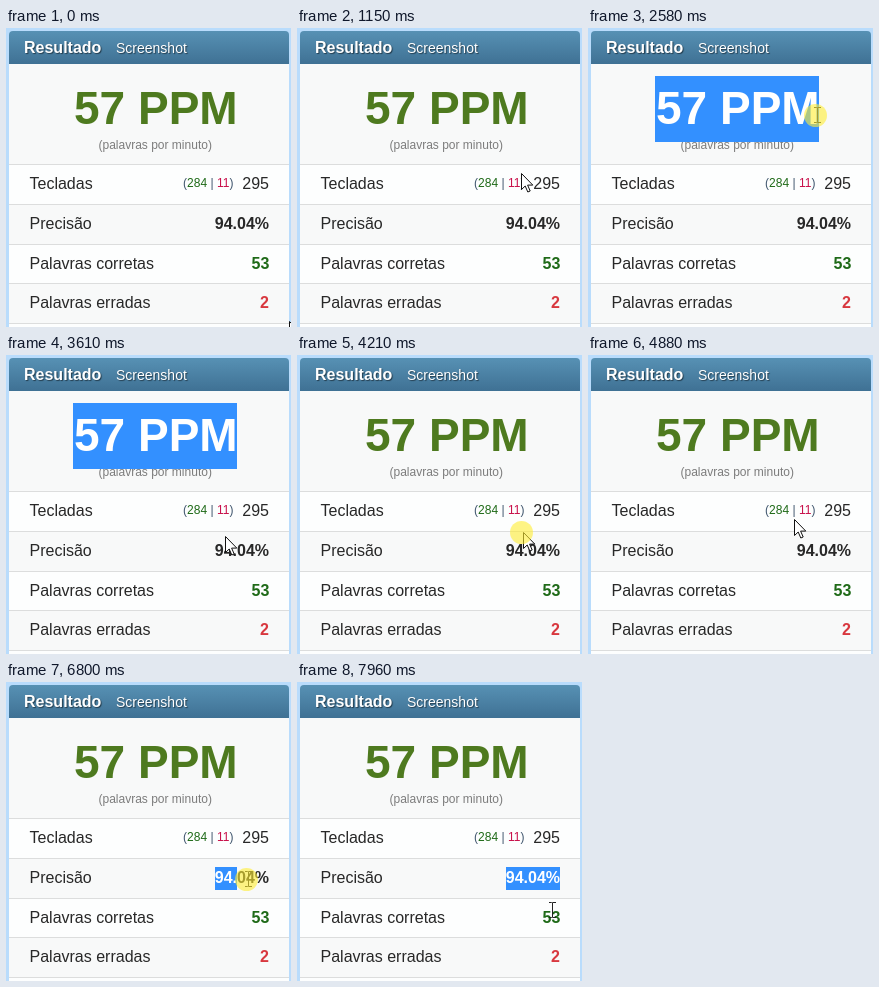
These frames come from a looping animation (285 px wide and 299 px high, 8 s). An HTML page:

```html
<!DOCTYPE html>
<html lang="pt">
<head>
<meta charset="utf-8">
<style>
html, body { margin: 0; width: 100%; height: 100%; overflow: hidden; background: #b9dcfc; }
svg { display: block; width: 285px; height: 299px; }
text { font: 16px "Liberation Sans", Arial, sans-serif; fill: #282828; white-space: pre; }
.b { font-weight: bold; }
.r { text-anchor: end; }
.big { font-size: 46px; }
.small { font-size: 12px; }
.head { fill: #fff; text-shadow: 1px 1px 1px rgba(0, 0, 0, .5); }
.good { fill: #1f6a18; }
.bad { fill: #d8383f; }
.sel rect { fill: #3390ff; }
.sel text { fill: #fff; }
</style>
</head>
<body>
<svg viewBox="0 0 285 299">
  <defs>
    <linearGradient id="bar" x2="0" y2="1">
      <stop stop-color="#5791b4"/><stop offset="1" stop-color="#3f7194"/>
    </linearGradient>
    <clipPath id="clipSpeed"><rect x="67" y="48" height="66"/></clipPath>
    <clipPath id="clipRate"><rect x="209" y="185" height="23"/></clipPath>
  </defs>

  <path fill="#fdfefe" d="M3 36h280v263H3z"/>
  <path fill="#f8f9f9" d="M3 36h280v100H3zM3 176h280v40H3zM3 255h280v40H3z"/>
  <path stroke="#dcdddd" d="M3 136.5h280M3 176.5h280M3 216.5h280M3 255.5h280M3 295.5h280"/>
  <path fill="url(#bar)" d="M3 36V7q0-4 4-4h272q4 0 4 4v29z"/>
  <text class="head b" x="18" y="25">Resultado</text>
  <text class="head" x="110" y="25" style="font-size:14px">Screenshot</text>

  <text class="b big" x="68" y="96" style="fill:#4e7a1f">57 PPM</text>
  <text class="small" x="92.5" y="121" style="fill:#7c7c7c">(palavras por minuto)</text>
  <text x="23.5" y="161">Tecladas</text>
  <text class="small r" x="227.4" y="159" style="fill:#40566e">(<tspan class="good">284</tspan> | <tspan style="fill:#c8104a">11</tspan>)</text>
  <text class="r" x="263" y="161">295</text>
  <text x="23.5" y="201">Precisão</text>
  <text class="b r" x="263" y="201">94.04%</text>
  <text x="23.5" y="241">Palavras corretas</text>
  <text class="b r good" x="263.4" y="241">53</text>
  <text x="23.5" y="280">Palavras erradas</text>
  <text class="b r bad" x="263" y="280">2</text>

  <g class="sel" id="speed" clip-path="url(#clipSpeed)">
    <rect x="67" y="48" width="164" height="66"/>
    <text class="b big" x="68" y="96">57 PPM</text>
  </g>
  <g class="sel" id="rate" clip-path="url(#clipRate)">
    <rect x="209" y="185" width="54" height="23"/>
    <text class="b r" x="263" y="201">94.04%</text>
  </g>

  <g id="pointer">
    <path id="arrow" fill="#fff" stroke="#111" d="M.5.5v16l3.7-3.5 2.6 6 2.4-1-2.6-5.9h5.2z"/>
    <path id="beam" fill="none" stroke="#222" d="M-3-7.5h2.5l.5.5.5-.5H4M.5-7V7M-3 7.5h2.5l.5-.5.5.5H4"/>
    <circle id="press" cx="-1.5" cy=".5" r="11.5" fill="#ffec32" fill-opacity=".6"/>
  </g>
</svg>
<script>
const $ = q => document.querySelector(q);
const LOOP = 8000, LAG = 50;
const texts = [...document.querySelectorAll("svg > text")];

// leave time, arrival time, x, y
const moves = [
  [20, 21, -20, 245],
  [720, 1070, 236, 150],
  [1070, 1560, 72, 79],
  [1730, 2580, 229, 87],
  [2940, 3610, 219, 181],
  [3650, 3900, 226, 177],
  [4300, 4880, 206, 164],
  [5950, 6440, 211, 196],
  [6600, 6940, 264, 198],
  [7620, 7960, 255, 228]
];

const within = (t, a, b) => t >= a && t < b;
const dragging = t => within(t, 1730, 2940) || within(t, 6600, 7620);
const smooth = k => k * k * (3 - 2 * k);
const show = (q, on) => $(q).style.display = on ? "" : "none";

function place(t) {
  let x = 283, y = 293;
  for (const [from, to, u, v] of moves) {
    if (t < from) break;
    let k = Math.min(1, (t - from) / (to - from));
    if (!dragging(from)) k = smooth(k);
    x += (u - x) * k;
    y += (v - y) * k;
  }
  if (within(t, 5070, 5850)) { // one lap around the key counts
    const a = smooth((t - 5070) / 780) * 2 * Math.PI;
    x -= 11 * (1 - Math.cos(a));
    y -= 18 * Math.sin(a);
  }
  return [x, y];
}

function hovers(x, y) {
  return texts.some(el => {
    const b = el.getBBox();
    return within(x, b.x, b.x + b.width) && within(y, b.y, b.y + b.height);
  });
}

// Selects each character once the pointer is past its middle.
function select(group, clip, t, active) {
  const text = $(group + " text"), box = $(clip + " rect");
  const x = active ? place(t - LAG)[0] : 0;
  let end = 0;
  for (let i = 0; i < text.getNumberOfChars(); i++) {
    const a = text.getStartPositionOfChar(i).x, b = text.getEndPositionOfChar(i).x;
    if (x > (a + b) / 2) end = b;
  }
  box.setAttribute("width", Math.max(0, Math.floor(end + .2) - box.getAttribute("x")));
}

function draw(t) {
  const [x, y] = place(t);
  const drag = dragging(t), beam = drag || hovers(x, y);
  $("#pointer").setAttribute("transform", `translate(${Math.round(x)} ${Math.round(y)})`);
  show("#press", drag || within(t, 4190, 4300));
  show("#beam", beam);
  show("#arrow", !beam);
  // The chosen text stays selected after the button is released.
  select("#speed", "#clipSpeed", Math.min(t, 2900), within(t, 1730, 4190));
  select("#rate", "#clipRate", Math.min(t, 7600), t >= 6600);
}

let start;
function tick(now) {
  start ??= now;
  draw((now - start) % LOOP);
  requestAnimationFrame(tick);
}
draw(0);
requestAnimationFrame(tick);
</script>
</body>
</html>
```
